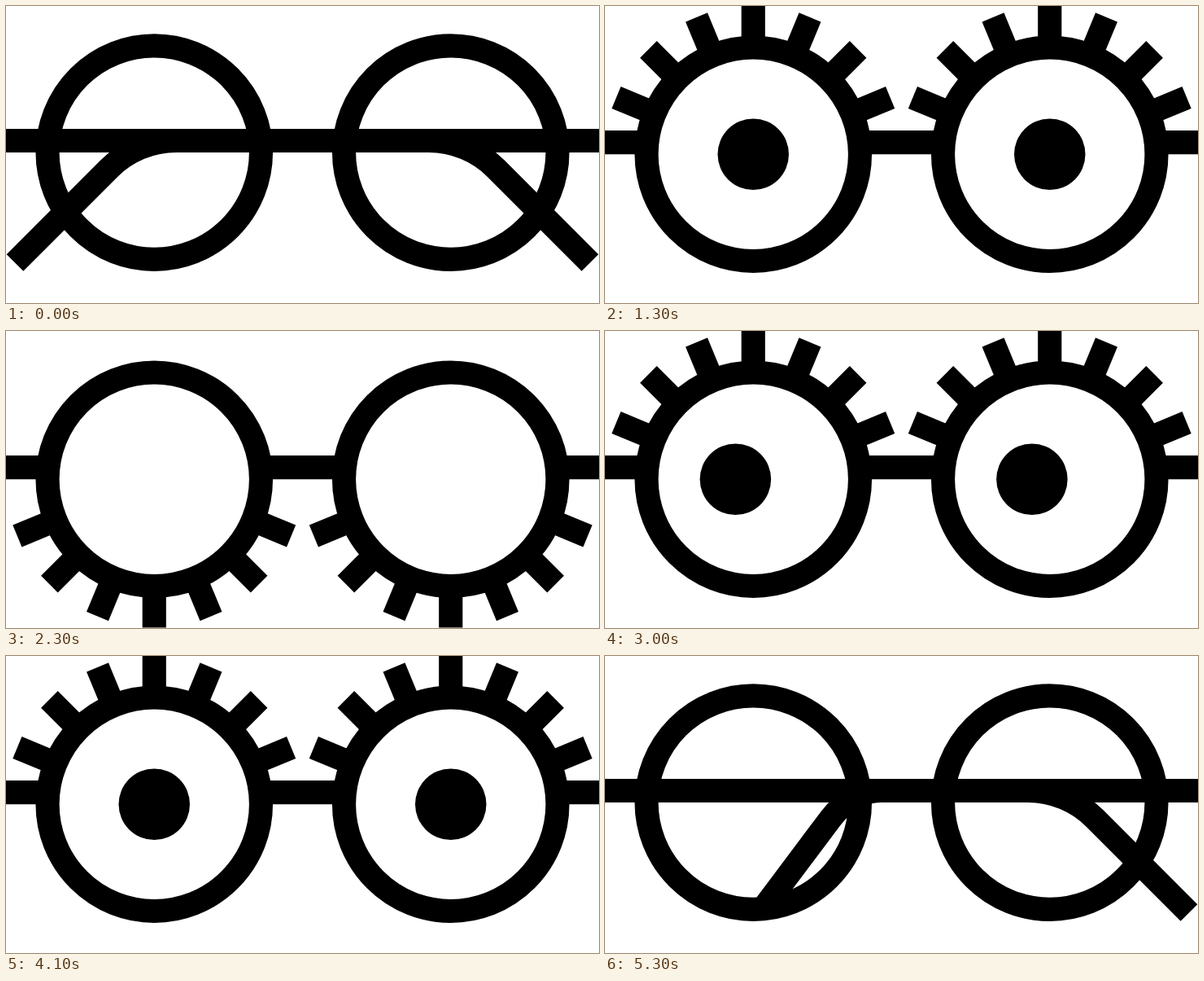
Write an HTML page that moves like this. It is 729 by 365 pixels and loops after 5.4 s.

```html
<!DOCTYPE html>
<html lang="en">
<head>
<meta charset="utf-8">
<title>Glasses and eyes</title>
<style>
  html, body { margin: 0; width: 100%; height: 100%; overflow: hidden; background: #fff; }
  svg { display: block; width: 729px; height: 365px; }
  .line { fill: none; stroke: #000; stroke-width: 29.16; }
</style>
</head>
<body>
<svg viewBox="0 0 729 365">
  <defs>
    <g id="lashes"></g>
    <circle id="rim" class="line" r="131.22" style="fill:#fff"/>
    <clipPath id="belowLid"><rect x="-120" y="0" width="240" height="120"/></clipPath>
    <g id="eye">
      <use id="lashSet" href="#lashes"/>
      <use href="#rim"/>
      <g id="pupilClip"><circle id="pupil" r="43.74"/></g>
      <path id="lid" class="line" d="M-125 0H125"/>
    </g>
  </defs>
  <g id="scene">
    <path class="line" d="M0 -14.58H729"/>
    <use href="#eye" x="182.25"/>
    <use href="#eye" x="546.75"/>
    <path id="armA" class="line"/>
    <path id="armB" class="line" transform="translate(729) scale(-1 1)"/>
  </g>
</svg>
<script>
const STEP = 100, STEPS = 54;
const $ = id => document.getElementById(id);
const clamp = v => Math.max(0, Math.min(1, v));
const show = (el, on) => el.setAttribute("display", on ? "inline" : "none");

// Seven lashes fanned over the upper half of the rim
for (let i = -3; i <= 3; i++) {
  const lash = document.createElementNS("http://www.w3.org/2000/svg", "path");
  lash.setAttribute("class", "line");
  lash.setAttribute("d", "M0 -131V-182.25");
  lash.setAttribute("transform", `rotate(${i * 22.5})`);
  $("lashes").append(lash);
}

// Temple arm squeezed horizontally towards its hinge; fold 1 = fully folded
function drawArm(el, fold) {
  show(el, fold > 0);
  if (fold <= 0) return;
  const r = 116.64, start = 519.7, c = Math.SQRT1_2, top = -14.58;
  const bendX = start + r * c, bendY = top + r * (1 - c), run = 115.8;
  el.setAttribute("d", `M0 ${top}H${start * fold}` +
    `A${r * fold} ${r} 0 0 1 ${bendX * fold} ${bendY}` +
    `L${(bendX + run) * fold} ${bendY + run}`);
}

function folds(k) {
  if (k < 13) return [clamp((12 - k) / 4), clamp((8 - k) / 4)];
  return [clamp((k - 46) / 4), clamp((k - 50) / 4)];
}

// Slide left, sweep over the top, slide back from the right
function gaze(k) {
  const r = 43.74;
  if (k < 30 || k > 40) return [0, 0];
  if (k === 30) return [-r / 2, 0];
  if (k === 40) return [r / 2, 0];
  const a = (k - 31) * Math.PI / 8;
  return [-r * Math.cos(a), -r * Math.sin(a)];
}

// Lid position: 0 open, 1 half, 2 shut; two blinks
function lidAt(k) {
  return k >= 18 && k < 26 ? [1, 2, 1, 0][(k - 18) % 4] : 0;
}

function draw(ms) {
  const k = Math.floor(ms / STEP) % STEPS;
  const awake = k >= 13 && k < 46;
  const lid = lidAt(k);
  const [a, b] = folds(k);
  const [x, y] = gaze(k);

  $("scene").setAttribute("transform", `translate(0 ${awake ? 182.25 : 180.1})`);
  drawArm($("armA"), a);
  drawArm($("armB"), b);

  show($("lashSet"), awake && lid !== 1);
  $("lashSet").setAttribute("transform", `scale(1 ${lid === 2 ? -1 : 1})`);
  show($("pupilClip"), awake && lid < 2);
  if (lid === 1) $("pupilClip").setAttribute("clip-path", "url(#belowLid)");
  else $("pupilClip").removeAttribute("clip-path");
  $("pupil").setAttribute("cx", x);
  $("pupil").setAttribute("cy", y);
  show($("lid"), lid === 1);
}

const begin = performance.now();
function tick() {
  draw(performance.now() - begin);
  requestAnimationFrame(tick);
}
tick();
</script>
</body>
</html>
```
